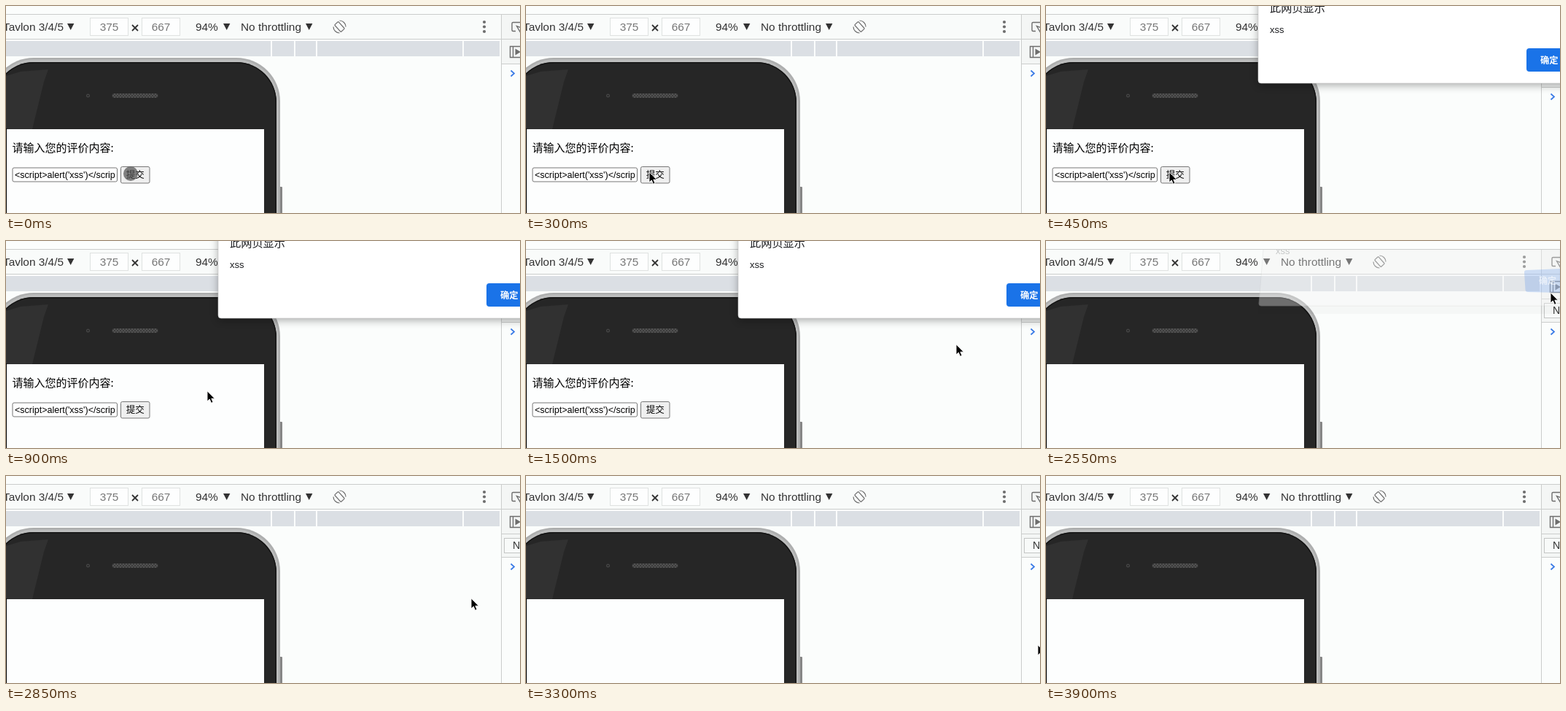
Recreate the animation shown at these times as an HTML page. Size 705 by 284 pixels, loop 4.57 s.

```html
<!DOCTYPE html>
<html lang="zh-CN">
<head>
<meta charset="utf-8">
<title>XSS demo</title>
<style>
html, body { margin: 0; width: 100%; height: 100%; overflow: hidden; background: #fbfdfc; }
svg { display: block; width: 705px; height: 284px; }
text { font-family: "Liberation Sans", Arial, sans-serif; white-space: pre; }
.cjk { font-family: "Noto Sans CJK SC", "Noto Sans CJK", sans-serif; }
.bar { font-size: 15.4px; fill: #333; }
.rule { stroke: #cbcdcc; fill: none; }
.icon { stroke: #6e6e6e; fill: none; stroke-width: 1.4; }
</style>
</head>
<body>
<svg viewBox="0 0 705 284">
  <defs>
    <clipPath id="field"><rect x="10" y="223" width="139.5" height="18"/></clipPath>
    <clipPath id="below"><rect y="12" width="705" height="272"/></clipPath>
    <clipPath id="body"><rect x="-17" y="77" width="388" height="400" rx="55"/></clipPath>
    <filter id="soft" x="-10%" y="-20%" width="120%" height="150%"><feGaussianBlur stdDeviation="6"/></filter>
    <pattern id="mesh" width="4" height="4" patternUnits="userSpaceOnUse">
      <rect width="4" height="4" fill="#3c3c3c"/>
      <path d="M0 0h2v2h-2zM2 2h2v2h-2z" fill="#525252"/>
    </pattern>
  </defs>

  <!-- device toolbar -->
  <rect y="12" width="705" height="33" fill="#f9fbfa"/>
  <path class="rule" d="M0 11.5H705M0 45.5H705"/>
  <g class="bar">
    <text x="79" y="34" text-anchor="end">Tavlon 3/4/5</text>
    <text x="260" y="34">94%</text>
    <text x="322" y="34">No throttling</text>
  </g>
  <path d="M84 24h9.400l-4.700 9zM298 24h9.400l-4.700 9zM411 24h9.400l-4.700 9z" fill="#333"/>
  <g fill="#fdfefe" stroke="#dfe2e1">
    <rect x="115.500" y="16.500" width="52" height="24"/>
    <rect x="186.500" y="16.500" width="52" height="24"/>
  </g>
  <g class="bar" text-anchor="middle" style="fill:#777">
    <text x="141.500" y="34">375</text>
    <text x="212.500" y="34">667</text>
  </g>
  <path d="M173 26l8 8M181 26l-8 8" stroke="#333" stroke-width="1.800"/>
  <g class="icon" transform="translate(457.500 28.500)" style="stroke-width:1.200">
    <rect x="-3.500" y="-6.500" width="7" height="13" rx="1" transform="rotate(-42)"/>
    <path d="M0 -8.500A8.500 8.500 0 0 1 8.500 0M0 8.500A8.500 8.500 0 0 1 -8.500 0"/>
  </g>
  <g fill="#6e6e6e">
    <circle cx="656" cy="22" r="2.100"/><circle cx="656" cy="28.500" r="2.100"/><circle cx="656" cy="35" r="2.100"/>
  </g>

  <!-- width ruler -->
  <path d="M0 48H677V69H0z" fill="#dbdfe4"/>
  <path d="M364 48V69M396 48V69M426 48V69M627 48V69" stroke="#fbfdfc" stroke-width="2"/>

  <!-- phone -->
  <rect x="375" y="248" width="4" height="50" rx="1" fill="#868686"/>
  <rect x="-22" y="71" width="398" height="420" rx="60" fill="#adaeae"/>
  <rect x="-20" y="73.500" width="393.500" height="420" rx="58" fill="#bcbdbd"/>
  <g clip-path="url(#body)">
    <rect x="-22" y="71" width="398" height="300" fill="#262626"/>
    <path d="M-22 100L0 96 20 90 58 87 52 104 36 169H-22z" fill="#313131"/>
    <rect x="-17" y="77" width="388" height="400" rx="55" fill="none" stroke="#141414" stroke-width="3"/>
  </g>
  <circle cx="112.500" cy="123" r="2.500" fill="#454545"/>
  <circle cx="112.500" cy="123" r="1" fill="#1c1c1c"/>
  <rect x="145.500" y="120" width="63" height="6" rx="3" fill="url(#mesh)"/>
  <rect y="168" width="1.200" height="116" fill="#000"/>
  <rect x="1" y="169" width="353" height="115" fill="#fdfefe"/>

  <!-- page -->
  <g id="form">
    <text class="cjk" x="8.500" y="200" font-size="15">请输入您的评价内容:</text>
    <rect x="9" y="222" width="143.500" height="19" rx="2" fill="#fff" stroke="#767676"/>
    <text x="12" y="235.500" font-size="12.500" clip-path="url(#field)">&lt;script&gt;alert('xss')&lt;/script&gt;</text>
    <rect x="157.500" y="220.500" width="39.500" height="22.500" rx="2" fill="#efefef" stroke="#767676"/>
    <text class="cjk" x="177.200" y="236" font-size="12.500" text-anchor="middle">提交</text>
  </g>

  <!-- side panel -->
  <rect x="680" y="12" width="25" height="67" fill="#f4f6f5"/>
  <path class="rule" d="M679.500 12V284M680 45.500H705M680 79.500H705"/>
  <path class="icon" d="M705 22.500H695.500Q694 22.500 694 24V33Q694 34.500 695.500 34.500H699M706 37L700.500 27.500 710 31"/>
  <path class="icon" d="M706 55.500H691.500V70.500H706M695.500 55.500V70.500"/>
  <path d="M698.500 58.500L706 63 698.500 67.500z" fill="#6e6e6e"/>
  <g id="tab">
    <rect x="680" y="80" width="25" height="31" fill="#f4f6f5"/>
    <path class="rule" d="M680 111.500H705"/>
    <rect x="683.500" y="85.500" width="40" height="20" fill="#f8faf9" stroke="#c3c5c4"/>
    <text x="695" y="100" font-size="14" fill="#333">N</text>
  </g>
  <path id="prompt" d="M692.500 -4L697 0 692.500 4" fill="none" stroke="#3879e6" stroke-width="1.700"/>

  <!-- alert -->
  <g id="alert">
    <rect x="291" y="-40" width="460" height="149" rx="4" fill="#000" opacity=".32" filter="url(#soft)"/>
    <rect x="291" y="-40" width="460" height="146" rx="4" fill="#fff" stroke="#bfc1c1" stroke-width=".6"/>
    <text class="cjk" x="307" y="8" font-size="15.200" fill="#202124">此网页显示</text>
    <text x="307" y="37" font-size="13" fill="#202124">xss</text>
    <rect id="ok" x="659" y="58" width="70" height="32" rx="4"/>
    <text class="cjk" x="678" y="78.500" font-size="12.300" font-weight="700" fill="#fff">确定</text>
  </g>

  <!-- alert fading out -->
  <g id="ghost" clip-path="url(#below)">
    <path d="M291 89H705V100H291z" fill="#000" opacity=".025"/>
    <path d="M299 0L292 86Q292 89 295 89H705V0z" fill="#f4f4f4" opacity=".35" stroke="#ccc" stroke-width=".8"/>
    <text x="315" y="18" font-size="13" fill="#c6c8c8">xss</text>
    <path d="M659 40L705 38V71L661 70Q658 70 657.500 67L656 43Q656 40 659 40z" fill="#4a86e8" opacity=".24"/>
    <text class="cjk" x="676" y="59" font-size="12" font-weight="700" fill="#fff" opacity=".6">确定</text>
  </g>

  <circle id="touch" cx="171" cy="230" r="10" fill="#505050" opacity=".7"/>
  <path id="cursor" d="M1 .8V15L4.300 12 6.500 17.300 9 16.200 6.800 11.200H11.400z" fill="#000" stroke="#fff" stroke-width=".9"/>
</svg>
<script>
const LOOP = 4570, OPEN = 450, CLOSE = 2550, FADED = 2700;
const el = id => document.getElementById(id);
const show = (id, on) => el(id).setAttribute('display', on ? 'inline' : 'none');

// [time, x, y] of the sampled pointer; no position means it is out of view
const steps = [
  [0], [300, 168, 227], [900, 275, 205], [1050, 390, 196], [1200, 412, 195],
  [1500, 589, 141], [1650, 667, 118], [1800, 656, 111], [1950], [2100, 694, 70],
  [2250, 691, 70], [2700, 646, 119], [2850, 637, 167], [3000, 662, 199], [3150],
  [3300, 701, 231], [3450, 683, 261], [3600, 671, 275], [3750, 673, 283], [3900]
];

function draw(t) {
  const open = t >= OPEN && t < CLOSE;
  const [, x, y] = steps.findLast(s => s[0] <= t);
  show('touch', t < 300);
  show('form', t < CLOSE);
  show('alert', open);
  show('ghost', t >= CLOSE && t < FADED);
  show('tab', t >= OPEN);
  el('ok').setAttribute('fill', t >= 2100 ? '#2f7ae3' : '#1a73e8');
  el('prompt').setAttribute('transform', `translate(0 ${t < OPEN ? 92.5 : 124.5})`);
  show('cursor', x !== undefined);
  if (x !== undefined) el('cursor').setAttribute('transform', `translate(${x} ${y})`);
}

const start = performance.now();
function tick() {
  draw((performance.now() - start) % LOOP);
  requestAnimationFrame(tick);
}
tick();
</script>
</body>
</html>
```
